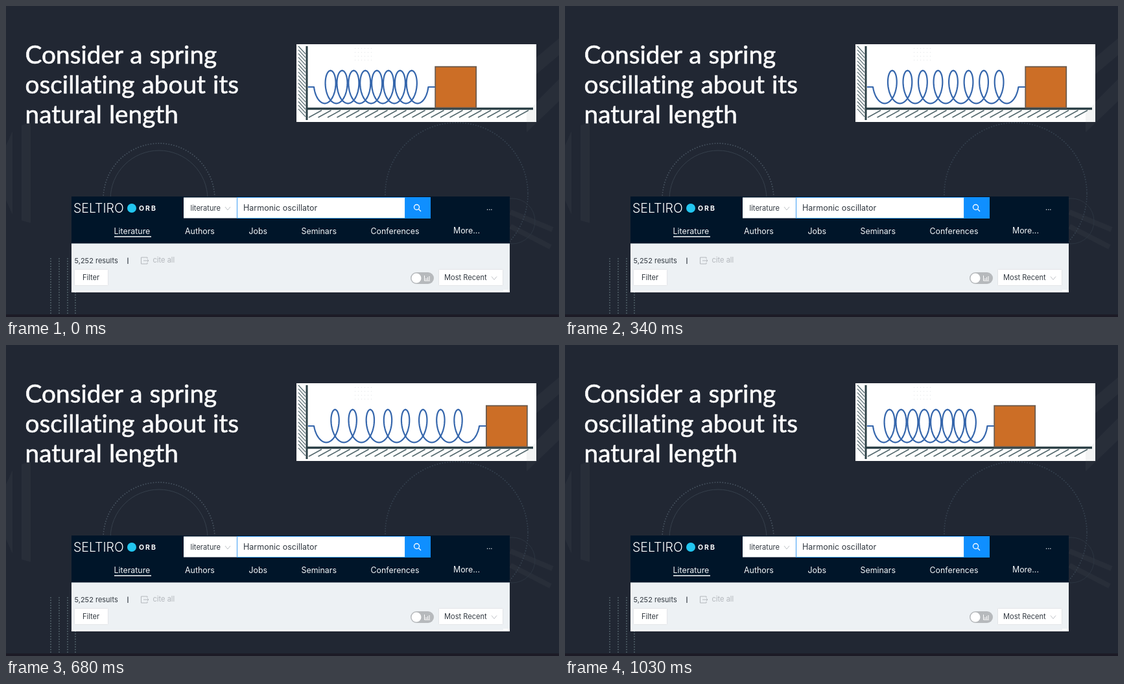
Animation of 853 by 480 pixels, one loop 1100 ms. Source, as an HTML page:

```html
<!DOCTYPE html>
<html lang="en">
<head>
<meta charset="utf-8">
<title>Spring oscillation</title>
<style>
  html, body { margin: 0; width: 100%; height: 100%; overflow: hidden; background: #212733; }
  svg { display: block; }
  text { font-family: Inter, sans-serif; }
  .title {
    font: 38.8px Lato, sans-serif; font-variant-ligatures: none; word-spacing: 1px;
    fill: #fff; stroke: #fff; stroke-width: .6;
  }
  .nav { font-size: 12.4px; fill: #f4f6f8; }
  .small { font-size: 11.1px; fill: #333a42; }
  .line { fill: none; }
  .dots { fill: none; stroke: #46525f; stroke-width: 1.9; stroke-linecap: round; stroke-dasharray: 0 4; }
</style>
</head>
<body>
<svg width="853" height="480" viewBox="0 0 853 480">
  <rect width="853" height="480" fill="#212733"/>

  <!-- Backdrop ornaments -->
  <g fill="#fff" fill-opacity=".03">
    <path d="M38 180V335L24 331V184ZM10 193V322L0 300V215Z"/>
    <path d="M803 163L853 113V147L803 195ZM803 92L853 50V76L803 118Z"/>
  </g>
  <path class="line" d="M778 318L843 345M778 340L840 372" stroke="#fff" stroke-opacity=".03" stroke-width="8"/>
  <circle class="dots" cx="236" cy="298" r="86"/>
  <circle class="line" cx="236" cy="298" r="75" stroke="#36404c"/>
  <circle class="dots" cx="695" cy="290" r="110" style="stroke:#364250"/>
  <circle class="line" cx="781" cy="332" r="35" stroke="#2c3541"/>
  <path class="dots" d="M69 390V480M82 390V480M95 390V480M107 390V480" style="stroke:#52626b"/>
  <rect y="476" width="853" height="4" fill="#1c1b26"/>

  <text class="title" x="29.500" y="89">Consider a spring</text>
  <text class="title" x="29.500" y="135">oscillating about its</text>
  <text class="title" x="29.500" y="181">natural length</text>

  <!-- Spring and block -->
  <rect x="448" y="59" width="370" height="120" fill="#fff"/>
  <path d="M803 163L818 150V179H803Z" fill="#f3f4f4"/>
  <path class="line" d="M538 65.500H568M538 71.500H568M538 77.500H568M538 83.500H568" stroke="#e0e3e6" stroke-dasharray="1 4"/>
  <path id="wall" class="line" stroke="#52676c" stroke-width="1.200"/>
  <path id="floor" class="line" stroke="#52676c" stroke-width="1.500"/>
  <path class="line" d="M464 62V176" stroke="#2c4046" stroke-width="3"/>
  <path class="line" d="M464 158.500H813" stroke="#2c4046" stroke-width="3.500"/>
  <path id="spring" class="line" stroke="#3566ac" stroke-width="2.200" stroke-linejoin="round"/>
  <rect id="block" y="93.700" width="63" height="63.300" fill="#cc6e26" stroke="#6b5c50" stroke-width="1.800"/>

  <!-- Search page -->
  <rect x="101" y="294" width="676" height="148" fill="#edf1f4"/>
  <rect x="101" y="294" width="676" height="72.500" fill="#001529"/>
  <path d="M101 439.500H767V438H777V442H101Z" fill="#fff"/>
  <text x="104" y="319" font-size="19.500" font-weight="300" fill="#fff">SELTIRO</text>
  <circle cx="194" cy="312" r="7" fill="#22c5ef"/>
  <text x="205" y="316" font-size="10.500" font-weight="700" letter-spacing="2" fill="#fff">ORB</text>

  <rect x="274" y="295.500" width="82" height="32" fill="#fff"/>
  <text class="small" x="284.500" y="315.500">literature</text>
  <rect x="356.500" y="295.500" width="259" height="32" fill="#fff" stroke="#40a0f5"/>
  <text x="366" y="316" font-size="12.500" fill="#333a42">Harmonic oscillator</text>
  <rect x="615.500" y="295" width="39.500" height="33" fill="#0f8fff"/>
  <g class="line" stroke="#fff" stroke-width="1.300">
    <circle cx="633.500" cy="310.500" r="4"/>
    <path d="M636.500 313.500L640 317"/>
  </g>
  <text x="741" y="315" font-size="11" fill="#fff">...</text>

  <g class="nav">
    <text x="166.500" y="352">Literature</text>
    <text x="276" y="352">Authors</text>
    <text x="374.500" y="352">Jobs</text>
    <text x="455.500" y="352">Seminars</text>
    <text x="562.500" y="352">Conferences</text>
    <text x="690" y="351">More...</text>
  </g>
  <path d="M167 356H224" stroke="#fff" stroke-width="1.300"/>

  <text class="small" x="105.500" y="397" style="font-size:11px">5,252 results</text>
  <path d="M188 388.500V398" stroke="#333a42" stroke-width="1.200"/>
  <path class="line" d="M218 390V388H208.500V398H218V396M212 393H220M218 391L220 393L218 395" stroke="#b3b7bc"/>
  <text class="small" x="226.500" y="396" style="fill:#b3b7bc">cite all</text>
  <g fill="#fff" stroke="#e3e5e8">
    <rect x="105.500" y="406.500" width="52" height="25" rx="1"/>
    <rect x="667.500" y="406.500" width="99" height="25" rx="1"/>
  </g>
  <text class="small" x="118" y="423">Filter</text>
  <text class="small" x="676" y="423">Most Recent</text>
  <path class="line" d="M338 310L342 315L346 310M749 417.500L753 422.500L757 417.500" stroke="#bfc3c7"/>
  <rect x="624" y="411" width="36" height="18" rx="9" fill="#b6b9bc"/>
  <circle cx="633" cy="420" r="7.500" fill="#fff"/>
  <path class="line" d="M645.500 416V424H654M648 423V420M650.500 423V418.500M653 423V417" stroke="#fff"/>
</svg>
<script>
  const LOOP = 1100, STEP = 70, START = 475, MID = 125;
  const el = id => document.getElementById(id);

  function hatch(id, from, to, gap, line) {
    let d = "";
    for (let v = from; v <= to; v += gap) d += line(v);
    el(id).setAttribute("d", d);
  }
  hatch("wall", 62, 164, 5.7, y => `M451 ${y}l11 12`);
  hatch("floor", 467, 793, 14.5, x => `M${x} 172l20 -11`);

  // Block position, sampled in steps with a rest at each end of the swing
  function blockX(t) {
    const moving = t >= 130 && t < 1030;
    const n = moving ? Math.floor((t + (t < 600 ? 10 : 20)) / STEP) : 1;
    return 705.4 + 43.5 * Math.cos((n - 8.5) * Math.PI / 7.5);
  }

  // Eight overlapping loops: a trochoid whose pitch follows the length
  function springPath(x) {
    const radius = 12.2, end = x - 10.5;
    const pitch = (end - START - 2 * radius) / 8.5;
    let d = `M466 ${MID}H${START}`;
    for (let i = 1; i <= 408; i++) {
      const a = i * Math.PI / 24;
      const px = START + pitch * a / (2 * Math.PI) + radius * (1 - Math.cos(a));
      d += `L${px.toFixed(2)} ${(MID + 25.3 * Math.sin(a)).toFixed(2)}`;
    }
    return d + `H${x}`;
  }

  function draw() {
    const x = blockX(performance.now() % LOOP);
    el("block").setAttribute("x", x + 0.3);
    el("spring").setAttribute("d", springPath(x));
    requestAnimationFrame(draw);
  }
  draw();
</script>
</body>
</html>
```
